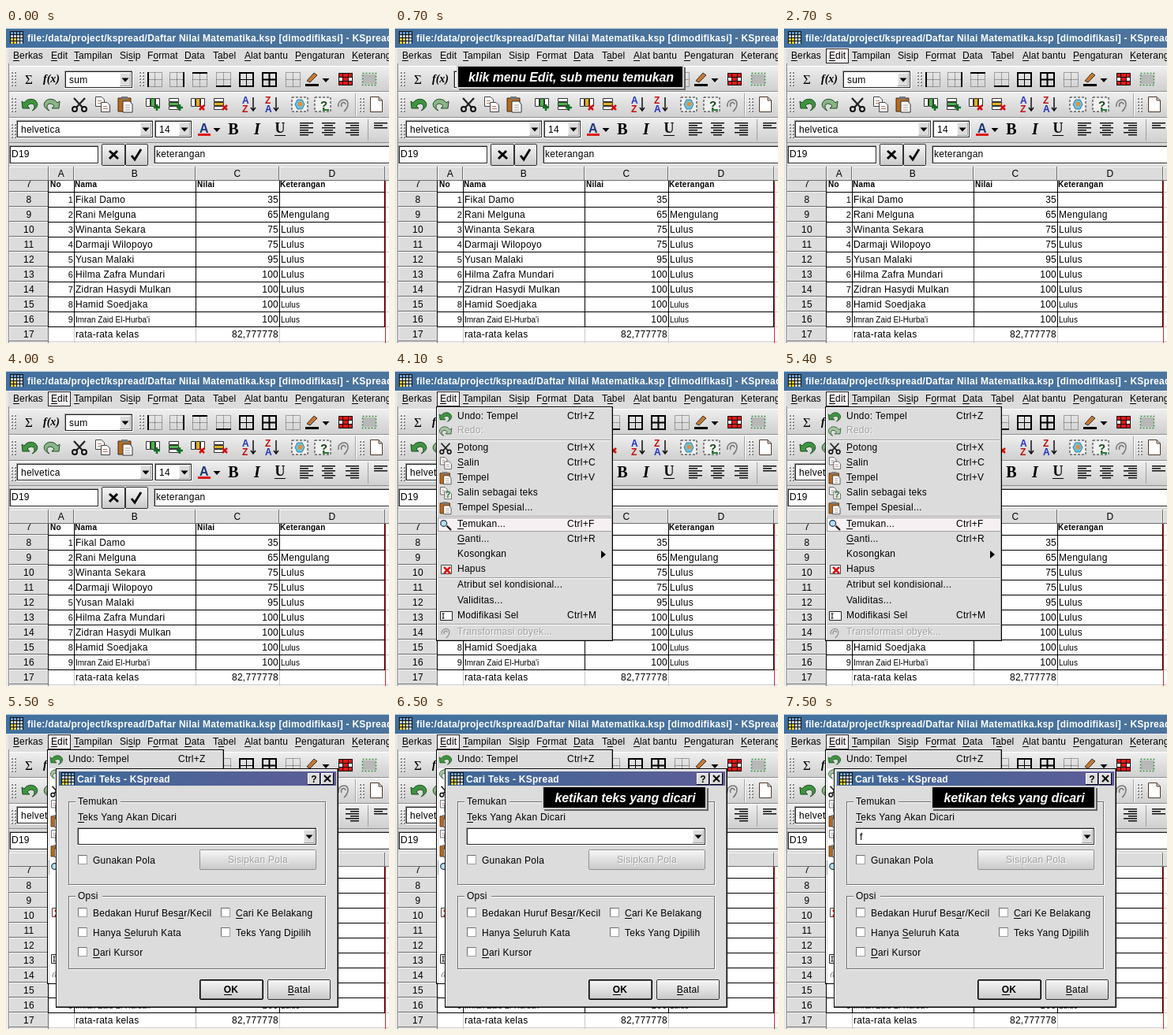
Write an HTML page with a canvas that moves like this. It is 485 px wide and 400 px high and loops after 8000 ms.

```html
<!DOCTYPE html>
<html lang="id">
<head>
<meta charset="utf-8">
<title>KSpread</title>
<style>
html, body { margin: 0; width: 100%; height: 100%; overflow: hidden; background: #dcdcdc; }
canvas { display: block; }
</style>
</head>
<body>
<canvas id="stage" width="485" height="400"></canvas>
<script>
const ctx = document.getElementById('stage').getContext('2d');
const LOOP = 8000;
const SANS = '"Liberation Sans", Arial, sans-serif';
const GRAY = '#dcdcdc', MID = '#a0a0a0', DARK = '#6e6e6e', LIT = '#f6f0f2';

function box(x, y, w, h, color) {
  ctx.fillStyle = color;
  ctx.fillRect(x, y, w, h);
}

function frame(x, y, w, h, color, lw = 1) {
  ctx.strokeStyle = color;
  ctx.lineWidth = lw;
  ctx.strokeRect(x + lw / 2, y + lw / 2, w - lw, h - lw);
}

// Bevelled rectangle: top-left and bottom-right edges in two colours.
function bevel(x, y, w, h, fill, a = '#fff', b = DARK) {
  box(x, y, w, h, b);
  box(x, y, w - 1, h - 1, a);
  box(x + 1, y + 1, w - 2, h - 2, fill);
}

function shade(y, h, ...colors) {
  const g = ctx.createLinearGradient(0, y, 0, y + h);
  colors.forEach((c, i) => g.addColorStop(i / (colors.length - 1), c));
  return g;
}

function field(x, y, w, h) {
  bevel(x, y, w, h, '#fff', MID, '#fff');
  frame(x + 1, y + 1, w - 2, h - 2, '#222');
}

function combo(s, x, y, w, h) {
  field(x, y, w, h);
  text(s, x + 6, y + h / 2 + 4);
  bevel(x + w - 17, y + 3, 14, h - 6, GRAY, '#f4f4f4', MID);
  arrow(x + w - 10, y + h / 2);
}

function button(x, y, w, h, edge = '#333') {
  box(x + 1, y, w - 2, h, edge);
  box(x, y + 1, w, h - 2, edge);
  box(x + 1, y + 1, w - 2, h - 2, shade(y, h, '#f8f8f8', '#e0e0e0', '#c8c8c8'));
}

// An ampersand marks the underlined letter.
function text(s, x, y, { size = 12, style = '', color = '#000', align = 'left', gap = 0.25, font = SANS } = {}) {
  const at = s.indexOf('&');
  const plain = s.replace('&', '');
  ctx.font = `${style} ${size}px ${font}`;
  ctx.letterSpacing = gap + 'px';
  ctx.fillStyle = color;
  const w = ctx.measureText(plain).width;
  if (align === 'center') x -= w / 2;
  if (align === 'right') x -= w;
  ctx.fillText(plain, x, y);
  if (at >= 0) {
    const lead = ctx.measureText(plain.slice(0, at)).width;
    box(Math.round(x + lead), y + 2, Math.round(ctx.measureText(plain[at]).width), 1, color);
  }
}

function path(x, y, d, stroke, fill, lw = 1) {
  const p = new Path2D(d);
  ctx.save();
  ctx.translate(x, y);
  if (fill) { ctx.fillStyle = fill; ctx.fill(p); }
  if (stroke) { ctx.strokeStyle = stroke; ctx.lineWidth = lw; ctx.stroke(p); }
  ctx.restore();
}

function arrow(x, y, color = '#000') {
  path(x, y, 'M-4.5 -2H4.5L0 3Z', null, color);
}

function grip(x, y, h) {
  for (let i = 0; i < h; i += 4) {
    for (const dx of [0, 4]) {
      box(x + dx, y + i, 2, 2, '#fff');
      box(x + dx + 1, y + i + 1, 2, 2, '#888');
    }
  }
}

function bar(y, h) {
  box(4, y, 481, h, shade(y, h, '#f0f0f0', '#dedede', '#cfcfcf'));
  box(4, y, 481, 1, '#fff');
  box(4, y + h - 1, 481, 1, '#8c8c8c');
}

function titleBar(x, y, w, h, left, right) {
  const g = ctx.createLinearGradient(x, 0, x + w, 0);
  g.addColorStop(0, left);
  g.addColorStop(1, right);
  box(x, y, w, h, g);
}

function sheetIcon(x, y) {
  box(x, y, 17, 16, '#111');
  for (let r = 0; r < 4; r++)
    for (let c = 0; c < 4; c++)
      box(x + 1 + c * 4, y + 1 + r * 4, 3, 3, r > 1 && c < 2 ? '#e8cc30' : r === 0 ? '#6c9cd0' : '#c8dcec');
}

const icons = {
  undo(x, y, c = '#3f9440') {
    path(x, y, 'M-10 -4L-9 5L0 5L-3 2C0 -2 6 -2 6 3C6 5 5 6 3 8C10 5 12 -1 7 -5C3 -8 -4 -7 -7 -2Z', '#1c4a20', c);
  },
  redo(x, y, c) {
    ctx.save();
    ctx.translate(x, y);
    ctx.scale(-1, 1);
    icons.undo(0, 0, c);
    ctx.restore();
  },
  cut(x, y) {
    path(x, y, 'M-7 -8L4 4M7 -8L-4 4', '#222', null, 2.2);
    path(x, y, 'M-9 6a3 3 0 1 0 6 0a3 3 0 1 0 -6 0M3 6a3 3 0 1 0 6 0a3 3 0 1 0 -6 0', '#111', null, 2);
  },
  copy(x, y) {
    for (const [dx, dy] of [[-9, -10], [-2, -3]]) {
      path(x + dx, y + dy, 'M.5 .5H8L11.5 4V12.5H.5Z', '#444', '#fff');
      path(x + dx, y + dy, 'M3 5.5H8M3 8.5H9', '#b07868');
    }
  },
  paste(x, y) {
    path(x, y, 'M-9 -8H7V9H-9Z', '#3c2c14', '#b86a20');
    box(x - 5, y - 10, 8, 4, '#777');
    path(x, y, 'M-3 -4H6L9 0V10H-3Z', '#333', '#fff');
    path(x, y, 'M0 1H6M0 4H6M0 7H6', '#999');
  },
  search(x, y) {
    path(x, y, 'M2 2L9 9', '#222', null, 3);
    path(x, y, 'M-8 -2a5 5 0 1 0 10 0a5 5 0 1 0 -10 0', '#234', '#b8e0f4', 1.5);
  },
  swirl(x, y, c = '#666') {
    path(x, y, 'M-6 3C-8 -5 4 -10 6 -2C7 4 1 9 1 9M-2 3C-4 -2 2 -5 3 0', c, null, 1.6);
  }
};

function small(name, x, y, color) {
  ctx.save();
  ctx.translate(x, y);
  ctx.scale(0.78, 0.78);
  icons[name](0, 0, color);
  ctx.restore();
}

function borderIcon(x, sides, inner) {
  const l = x - 9, t = 56;
  ctx.setLineDash([1, 1]);
  path(l, t, 'M.5 .5H18.5V18.5H.5ZM9.5 0V19M0 9.5H19', '#555');
  ctx.setLineDash([]);
  if (inner) path(l, t, 'M9.5 0V19M0 9.5H19', '#000', null, inner);
  if (sides.includes('l')) box(l, t, 2, 19, '#000');
  if (sides.includes('r')) box(l + 17, t, 2, 19, '#000');
  if (sides.includes('t')) box(l, t, 19, 2, '#000');
  if (sides.includes('b')) box(l, t + 17, 19, 2, '#000');
}

function cellsIcon(x, y, upright, add) {
  for (let i = 0; i < 3; i++) {
    const c = i === 1 ? (add ? '#48b448' : '#e0b020') : '#fff';
    if (upright) path(x - 9 + i * 6, y - 8, 'M.5 .5H5.5V10.5H.5Z', '#333', c);
    else path(x - 9, y - 8 + i * 5, 'M.5 .5H12.5V4.5H.5Z', '#333', c);
  }
  if (add) path(x + 5, y + 4, 'M-4 0H4M0 -4V4', '#087020', null, 2.5);
  else path(x + 5, y + 4, 'M-3 -3L3 3M3 -3L-3 3', '#d01010', null, 2.5);
}

function sortIcon(x, up) {
  text(up ? 'A' : 'Z', x - 9, 96, { style: 'bold', color: up ? '#2030c0' : '#c01010' });
  text(up ? 'Z' : 'A', x - 9, 107, { style: 'bold', color: up ? '#c01010' : '#2030c0' });
  path(x + 5, 97, 'M0 -9V7M-3 4L0 8L3 4', '#111', null, 1.5);
}

function lines(x, y, widths, align) {
  widths.forEach((w, i) => box(x + (align === 'right' ? 17 - w : align === 'center' ? (17 - w) / 2 : 0), y + i * 3, w, 1.5, '#111'));
}

const menuBar = [['&Berkas', 9], ['&Edit', 57], ['&Tampilan', 86], ['Si&sip', 144], ['F&ormat', 179],
  ['&Data', 226], ['T&abel', 262], ['&Alat bantu', 302], ['&Pengaturan', 366], ['&Keterangan', 438]];

function drawBars(edit) {
  box(0, 0, 485, 400, GRAY);
  titleBar(0, 0, 485, 25, '#42709e', '#4c749c');
  box(0, 0, 485, 1, '#c8d8e4');
  sheetIcon(5, 4);
  text('file:/data/project/kspread/Daftar Nilai Matematika.ksp [dimodifikasi] - KSpread', 27, 17, { style: 'bold', color: '#fff' });
  box(0, 25, 485, 1, '#f4f4f4');
  if (edit) {
    box(53, 26, 29, 19, '#222');
    box(54, 27, 27, 17, edit === 'on' ? LIT : GRAY);
  }
  for (const [s, x] of menuBar) text(s, x, 39, { gap: 0.1 });

  bar(48, 33);
  bar(81, 33);
  bar(114, 32);
  grip(6, 55, 20);
  grip(6, 88, 20);
  grip(6, 121, 18);

  text('Σ', 24, 71, { size: 17, font: '"Liberation Serif", serif' });
  text('f(x)', 47, 69, { size: 14, style: 'italic bold', font: '"Liberation Serif", serif', gap: 0 });
  combo('sum', 74, 54, 87, 23);
  grip(168, 55, 20);
  borderIcon(188, 'l');
  borderIcon(216, 'r');
  borderIcon(245, 't');
  borderIcon(275, 'b');
  borderIcon(304, 'lrtb', 1);
  borderIcon(333, 'lrtb', 2);
  borderIcon(363, '');
  path(387, 62, 'M-6 5L3 -5L7 -2L-2 7Z', '#333', '#c87830');
  box(379, 71, 17, 3, '#000');
  arrow(405, 66);
  box(421, 57, 18, 16, '#e01818');
  box(422, 63, 5, 5, '#fff');
  box(434, 63, 5, 5, '#fff');
  path(430, 65, 'M-8.5 -7.5H8.5V7.5H-8.5ZM-8 -2.5H8M-8 2.5H8M-3.5 -7V7M3.5 -7V7', '#111');
  path(460, 65, 'M-8 -6H8V6H-8Z', null, '#b8b8b8');
  ctx.setLineDash([2, 2]);
  path(460, 65, 'M-8.5 -7.5H8.5V7.5H-8.5Z', '#30903c', null, 1.5);
  ctx.setLineDash([]);

  icons.undo(30, 97);
  icons.redo(58, 97, '#8cb488');
  icons.cut(93, 97);
  icons.copy(122, 97);
  icons.paste(151, 97);
  cellsIcon(186, 97, true, true);
  cellsIcon(215, 97, false, true);
  cellsIcon(243, 97, true, false);
  cellsIcon(272, 97, false, false);
  sortIcon(308, true);
  sortIcon(337, false);
  for (const x of [372, 401]) {
    ctx.setLineDash([3, 2]);
    path(x, 97, 'M-10 -9H10V9H-10Z', '#222', '#f0f0f0');
    ctx.setLineDash([]);
  }
  path(372, 97, 'M-6 0L-3 -6H3L6 0L3 6H-3Z', '#3880a0', '#70c0d8');
  box(370, 94, 5, 5, '#e09040');
  text('?', 398, 103, { size: 15, style: 'bold', color: '#184818' });
  path(403, 104, 'M-2 0H6', '#208030', null, 2);
  icons.swirl(427, 97, '#777');
  box(442, 83, 1, 29, MID);
  box(443, 83, 1, 29, '#fff');
  grip(447, 88, 20);
  path(469, 97, 'M-7.5 -9.5H3L7.5 -5V9.5H-7.5ZM3 -9.5V-5H7.5', '#503828', '#fff');

  combo('helvetica', 13, 117, 174, 23);
  combo('14', 188, 117, 48, 23);
  text('A', 251, 133, { size: 16, style: 'bold', align: 'center', color: '#203878' });
  box(243, 134, 16, 3, '#e01818');
  arrow(267, 129);
  const serif = { size: 20, align: 'center', font: '"Liberation Serif", serif' };
  text('B', 288, 135, { ...serif, style: 'bold' });
  text('I', 318, 135, { ...serif, style: 'bold italic' });
  text('U', 347, 133, { ...serif, size: 18, style: 'bold' });
  box(340, 136, 14, 1, '#000');
  lines(372, 120, [17, 11, 17, 11, 17, 11]);
  lines(400, 120, [17, 11, 17, 11, 17, 11], 'center');
  lines(430, 120, [17, 11, 17, 11, 17, 11], 'right');
  box(458, 116, 1, 27, MID);
  lines(466, 120, [17, 11, 17]);

  box(4, 146, 481, 30, GRAY);
  field(4, 149, 114, 24);
  text('D19', 7, 164);
  button(121, 147, 30, 28);
  button(151, 147, 29, 28);
  path(136, 161, 'M-5 -5L6 5M5 -5L-5 5', '#000', null, 3);
  path(165, 161, 'M-6 1L-2 6L6 -7', '#000', null, 2.8);
  field(187, 149, 300, 24);
  text('keterangan', 190, 164);
}

const cols = [[54, 86, 'A'], [86, 240, 'B'], [240, 346, 'C'], [346, 480, 'D'], [480, 490, '']];
const rows = [['Fikal Damo', 35, ''], ['Rani Melguna', 65, 'Mengulang'], ['Winanta Sekara', 75, 'Lulus'],
  ['Darmaji Wilopoyo', 75, 'Lulus'], ['Yusan Malaki', 95, 'Lulus'], ['Hilma Zafra Mundari', 100, 'Lulus'],
  ['Zidran Hasydi Mulkan', 100, 'Lulus'], ['Hamid Soedjaka', 100, 'Lulus'], ["Imran Zaid El-Hurba'i", 100, 'Lulus']];

function drawSheet() {
  box(4, 176, 481, 224, '#fff');
  box(4, 176, 50, 224, GRAY);
  for (const [l, r, name] of cols) {
    bevel(l, 176, r - l, 18, GRAY, '#f4f4f4', DARK);
    text(name, (l + r) / 2, 189, { align: 'center' });
  }
  bevel(4, 176, 50, 18, GRAY, '#f4f4f4', DARK);

  ctx.save();
  ctx.beginPath();
  ctx.rect(4, 194, 481, 206);
  ctx.clip();
  for (let i = -1; i < 11; i++) {
    const y = 208 + i * 19;
    bevel(4, y, 50, 19, GRAY, '#f4f4f4', DARK);
    text(String(8 + i), 29, y + 14 - (i < 0 ? 1 : 0), { align: 'center' });
    box(54, y + 19, 431, 1, '#c8c8c8');
  }
  for (const [, r] of cols) box(r, 194, 1, 206, '#c8c8c8');
  for (let i = 0; i < 10; i++) box(54, 208 + i * 19, 427, 1, '#000');
  for (const x of [53, 86, 240, 346, 479]) box(x, 194, 1, 186, '#000');
  box(480, 194, 1, 206, '#e02020');

  const head = { size: 10, style: 'bold' };
  text('No', 56, 202, head);
  text('Nama', 87, 202, head);
  text('Nilai', 242, 202, head);
  text('Keterangan', 347, 202, head);
  rows.forEach(([name, score, note], i) => {
    const y = 222 + i * 19;
    const tiny = { size: 10, gap: 0 };
    text(String(i + 1), 85, y, { align: 'right', size: 11 });
    text(name, 88, y, i === 8 ? tiny : {});
    text(String(score), 345, y, { align: 'right' });
    text(note, 348, y, i > 6 ? tiny : {});
  });
  text('rata-rata kelas', 88, 393);
  text('82,777778', 345, 393, { align: 'right' });
  ctx.restore();
  box(0, 25, 3, 375, '#e8e8e8');
  box(3, 45, 1, 355, '#888');
}

const items = [['Undo: Tempel', 58, 'Z', 'undo'], ['Redo:', 76, '', 'redo'], ['&Potong', 98, 'X', 'cut'],
  ['&Salin', 117, 'C', 'copy'], ['&Tempel', 136, 'V', 'paste'], ['Salin sebagai teks', 155, '', 'copy'],
  ['Tempel Spesial...', 174, '', 'paste'], ['&Temukan...', 195, 'F', 'search'], ['&Ganti...', 214, 'R'],
  ['Kosongkan', 233], ['Hapus', 252], ['Atribut sel kondisional...', 272], ['Validitas...', 292],
  ['Modifikasi Sel', 311, 'M'], ['Transformasi obyek...', 332, '', 'swirl']];

// Once the dialog is up, the menu below its title stays blank but for the icons.
function drawMenu(lit, stale) {
  box(52, 45, 224, 298, '#000');
  bevel(53, 46, 222, 296, GRAY, '#fff', MID);
  for (const y of [87, 184, 262, 321]) {
    box(55, y, 218, 1, MID);
    box(55, y + 1, 218, 1, '#fff');
  }
  box(54, 186, 221, 18, MID);
  box(55, 187, 219, 16, lit ? LIT : GRAY);
  if (stale) box(55, 69, 219, 273, '#fff');
  for (const [s, y, key, icon] of items) {
    const off = s === 'Redo:' || y === 332;
    if (off) text(s, 80, y + 4, { color: '#fff' });
    const color = off ? MID : '#000';
    text(s, 79, y + 3, { color });
    if (key) text('Ctrl+' + key, 218, y + 3);
    if (icon) small(icon, 64, y, off ? (icon === 'redo' ? '#a8c4a4' : '#909090') : undefined);
  }
  text('?', 64, 161, { size: 10, style: 'bold', color: '#107028' });
  path(263, 233, 'M-2 -5L4 0L-2 5Z', null, '#000');
  path(65, 252, 'M-6.5 -5.5H6.5V5.5H-6.5Z', '#444', '#fff');
  path(66, 253, 'M-4 -4L4 4M4 -4L-4 4', '#e01010', null, 2.5);
  path(65, 311, 'M-7.5 -5.5H7.5V5.5H-7.5Z', '#222', '#fff');
  path(61, 311, 'M0 -3V3M-1.5 -3H1.5M-1.5 3H1.5', '#000');
}

function group(y, h, label, w) {
  frame(80, y + 1, 326, h, '#fff');
  frame(79, y, 326, h, DARK);
  box(88, y - 2, w, 5, GRAY);
  text(label, 91, y + 4);
}

function check(label, x, y) {
  bevel(x, y, 12, 12, '#fff', DARK, MID);
  text(label, x + 19, y + 11);
}

function drawDialog(typed) {
  box(63, 69, 358, 304, '#000');
  bevel(64, 70, 356, 302, GRAY, '#fff', DARK);
  titleBar(67, 73, 351, 18, '#3f6a98', '#5e5c98');
  sheetIcon(70, 74);
  text('Cari Teks - KSpread', 90, 87, { style: 'bold', color: '#fff' });
  for (const x of [382, 399]) bevel(x, 75, 16, 15, GRAY, '#fff', '#000');
  text('?', 390, 87, { style: 'bold', align: 'center' });
  path(407, 82, 'M-4 -4L4 4M4 -4L-4 4', '#000', null, 2);

  group(111, 106, 'Temukan', 57);
  text('&Teks Yang Akan Dicari', 91, 135);
  combo(typed ? 'f' : '', 90, 144, 304, 23);
  check('Gunakan Pola', 91, 179);
  button(245, 172, 148, 26, '#909090');
  text('Sisipkan Pola', 320, 190, { align: 'center', color: '#fff' });
  text('Sisipkan Pola', 319, 189, { align: 'center', color: MID });

  group(231, 93, 'Opsi', 34);
  check('Bedakan Huruf Bes&ar/Kecil', 91, 246);
  check('Hanya &Seluruh Kata', 91, 271);
  check('&Dari Kursor', 91, 296);
  check('&Cari Ke Belakang', 272, 246);
  check('Teks Yang D&ipilih', 272, 271);
  button(245, 337, 81, 26, '#000');
  frame(246, 338, 79, 24, '#555');
  text('&OK', 285, 354, { style: 'bold', align: 'center' });
  button(331, 337, 80, 26);
  text('&Batal', 371, 354, { align: 'center' });
}

function hint(s, x, y, w) {
  box(x + 3, y + 3, w - 3, 29, '#666');
  box(x, y, w - 2, 30, '#d0d0d0');
  box(x + 2, y + 2, w - 6, 26, '#000');
  text(s, x + w / 2, y + 21, { size: 16, style: 'italic bold', color: '#fff', align: 'center', gap: -0.1 });
}

// Click flash: off and on twice at 100 ms each.
const flashOff = (t, start) => t >= start && t < start + 400 && Math.floor((t - start) / 100) % 2 === 0;

function draw(t) {
  drawBars(t < 2700 ? '' : flashOff(t, 3700) ? 'off' : 'on');
  drawSheet();
  if (t >= 700 && t < 2700) hint('klik menu Edit, sub menu temukan', 78, 47, 290);
  if (t >= 4100) drawMenu(!flashOff(t, 5100), t >= 5500);
  if (t >= 5500) drawDialog(t >= 7500);
  if (t >= 6500) hint('ketikan teks yang dicari', 186, 91, 211);
}

const start = performance.now();
function tick() {
  draw((performance.now() - start) % LOOP);
  requestAnimationFrame(tick);
}
tick();
</script>
</body>
</html>
```
